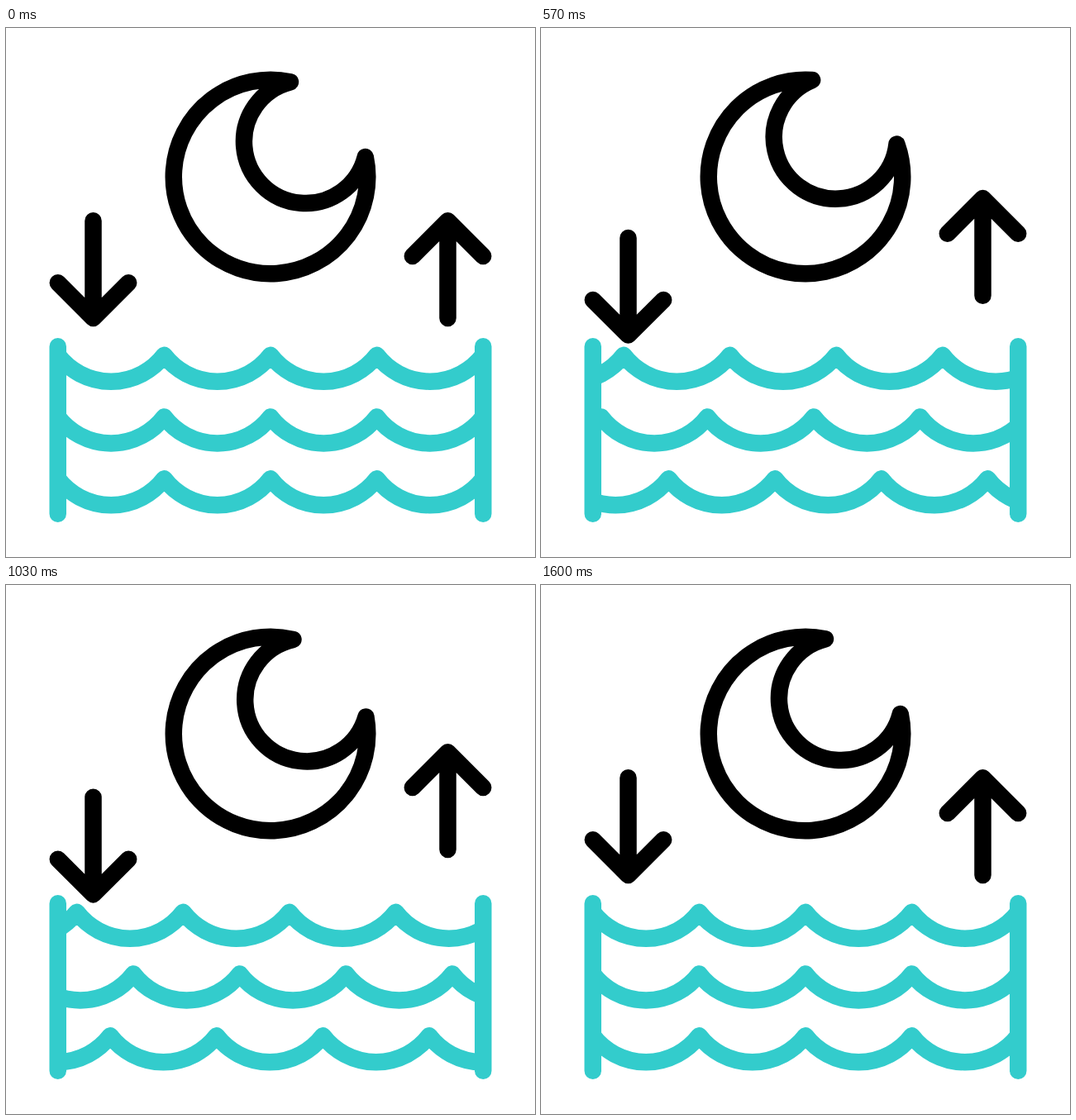
These frames come from a looping animation (640x640 px, 1.67 s). An HTML page:

```html
<!DOCTYPE html>
<html lang="en">
<head>
<meta charset="utf-8">
<title>Tides</title>
<style>
  html, body { margin: 0; width: 100%; height: 100%; overflow: hidden; background: #fff; }
  svg { display: block; width: 100%; height: 100%; }
  .line { fill: none; stroke-width: 20.5; stroke-linecap: round; stroke-linejoin: round; }
  .sea { stroke: #33cccc; }
  .ink { stroke: #000; }
</style>
</head>
<body>
<svg viewBox="0 0 640 640">
  <clipPath id="basin"><rect x="62.75" y="370" width="514.5" height="240"/></clipPath>
  <g class="line sea">
    <g id="waves" clip-path="url(#basin)"></g>
    <path d="M62.75 385.3V587.7M577.25 385.3V587.7"/>
  </g>
  <g class="line ink">
    <path id="moon" d="M344 65.2A117.25 117.25 0 1 0 434.8 156A74.6 74.6 0 1 1 344 65.2Z"/>
    <path id="down" d="M105.5 233.3V351M62.8 308.3L105.5 351L148.2 308.3"/>
    <path id="up" d="M534.5 351V233.3M491.8 276L534.5 233.3L577.2 276"/>
  </g>
</svg>
<script>
const LOOP = 1670, TICK = 100 / 3, LAST = 48;
const LEFT = 62.75, SPAN = 514.5, WAVE = SPAN / 4;

// Keys are [tick, value]
const SWING = [[0, 0], [14, -10], [26, 4], [38, -2], [48, 0]];
const BOB = [[0, 0], [10.4, 1], [12.5, 1], [24, 0]];
const ROWS = [
  { y: 395.8, start: 0.7, length: 35.6 },
  { y: 470.5, start: 4.6, length: 37.3 },
  { y: 545.3, start: 10.2, length: 36.2 }
];

const $ = id => document.getElementById(id);
const clamp = v => Math.min(1, Math.max(0, v));
const smooth = s => s * s * (3 - 2 * s);

// cubic-bezier(.42, 0, .58, 1)
function easeInOut(x) {
  let lo = 0, hi = 1;
  for (let i = 0; i < 20; i++) {
    const s = (lo + hi) / 2;
    if (1.26 * s - 0.78 * s * s + 0.52 * s ** 3 < x) lo = s; else hi = s;
  }
  return smooth(hi);
}

function track(keys, n) {
  const i = Math.max(1, keys.findIndex(k => k[0] >= n));
  const [t0, a] = keys[i - 1], [t1, b] = keys[i];
  return a + (b - a) * smooth(clamp((n - t0) / (t1 - t0)));
}

const hump = `a80.8 80.8 0 0 0 ${WAVE} 0`;
for (const row of ROWS) {
  row.el = document.createElementNS("http://www.w3.org/2000/svg", "path");
  row.el.setAttribute("d", `M${LEFT} ${row.y}` + hump.repeat(6));
  $("waves").append(row.el);
}

const move = (el, x, y) => el.setAttribute("transform", `translate(${x} ${y})`);

function draw(n) {
  for (const { el, start, length } of ROWS) {
    const k = clamp((n - start) / length);
    const shift = k === 0 || k === 1 ? 0 : SPAN * easeInOut(k);
    move(el, -(shift % WAVE), 0);
  }
  const bob = track(BOB, n % 24);
  move($("down"), 0, 31.2 * bob);
  move($("up"), 0, -41.3 * bob);
  $("moon").setAttribute("transform", `rotate(${track(SWING, n)} 320 180)`);
}

const begin = performance.now();
function frame() {
  const t = (performance.now() - begin) % LOOP;
  draw(Math.min(LAST, Math.floor((t + 3.4) / TICK)));
  requestAnimationFrame(frame);
}
frame();
</script>
</body>
</html>
```
